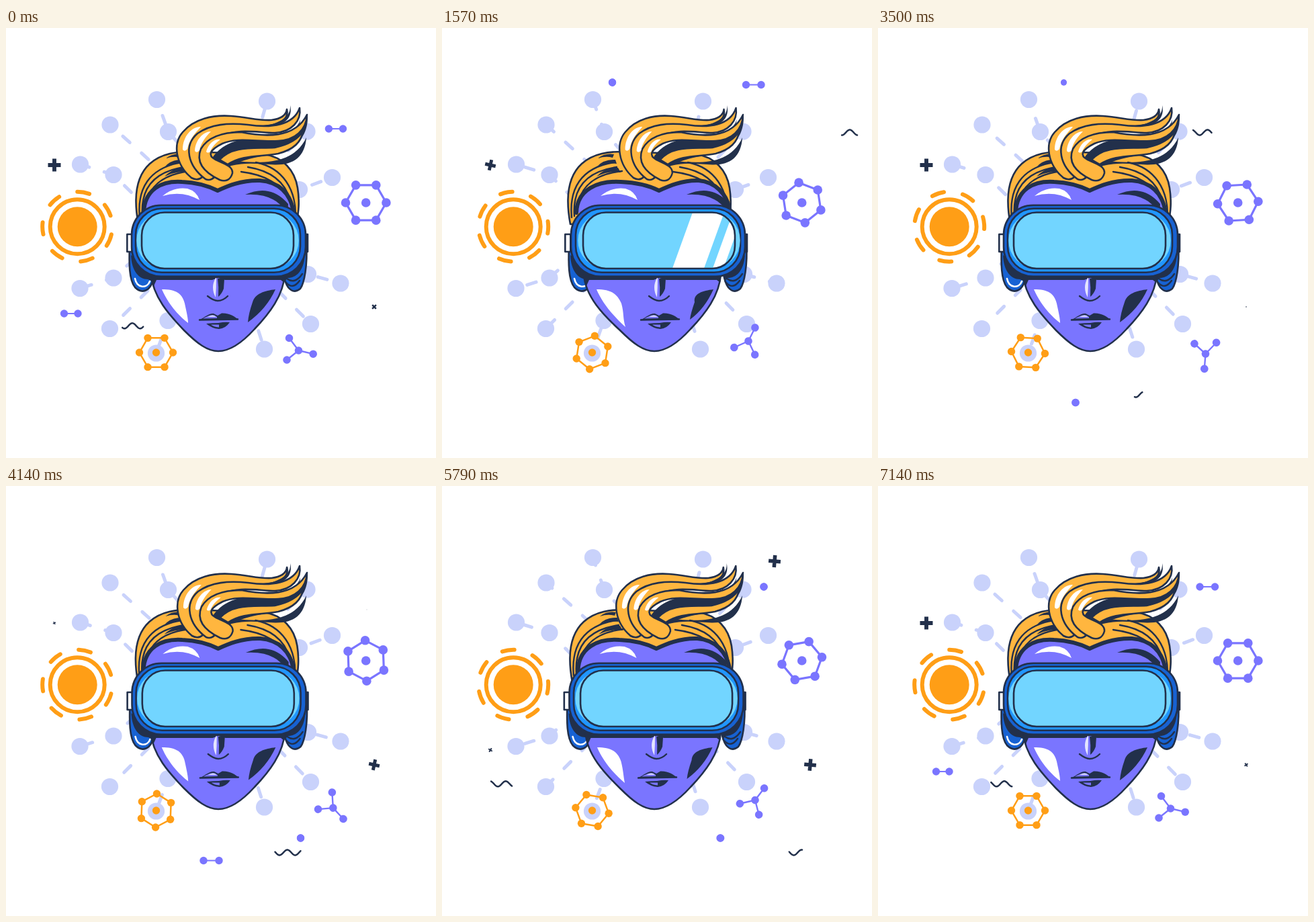
Animation of 640 by 640 pixels, one loop 7.21 s. Source, as an HTML page:

```html
<!DOCTYPE html>
<html lang="en">
<head>
<meta charset="utf-8">
<title>VR head</title>
<style>
html, body { margin: 0; width: 100%; height: 100%; overflow: hidden; background: #fff; }
svg { display: block; width: 100vw; height: 100vh; }
</style>
</head>
<body>
<svg id="stage" viewBox="0 0 640 640"></svg>
<script>
const LOOP = 7210, TURN = 7140;
const INK = '#22304b', PURPLE = '#7a75ff', HAIR = '#ffb63f', ORANGE = '#ff9e16',
      PALE = '#c9d2fb', BLUE = '#1762d3', BRIGHT = '#2196ff', LENS = '#72d5ff';
const OUTLINE = `stroke="${INK}" stroke-width="2.6" stroke-linejoin="round"`;

const clamp = v => Math.max(0, Math.min(1, v));
const smooth = v => (v = clamp(v), v * v * (3 - 2 * v));
const wrap = (t, start) => ((t - start) % LOOP + LOOP) % LOOP;

const fill = (d, color) => `<path d="${d}" fill="${color}"/>`;
const shape = (d, color) => `<path d="${d}" fill="${color}" ${OUTLINE}/>`;
const line = (d, color = INK, width = 2.4, extra = '') =>
  `<path d="${d}" fill="none" stroke="${color}" stroke-width="${width}" stroke-linecap="round" stroke-linejoin="round" ${extra}/>`;
const dot = (x, y, r, color) => `<circle cx="${x}" cy="${y}" r="${r}" fill="${color}"/>`;
const box = (x, y, w, h, r, color) =>
  `<rect x="${x}" y="${y}" width="${w}" height="${h}" rx="${r}" fill="${color}" ${OUTLINE}/>`;
const group = (transform, body) => `<g transform="${transform}">${body}</g>`;
const shift = (dx, body) => group(`translate(${dx} 0)`, body);

// Background network: path and dash phase
const NODES = [[224.5, 106.5], [388.5, 109], [155, 144], [241.5, 154.5], [448, 154], [110.5, 203],
  [160, 218.5], [485.5, 222.5], [436.5, 240.5], [110, 387.5], [160, 372], [449.5, 366.5],
  [498, 380], [154.5, 447.5], [241, 435.5], [453.5, 440.5], [384.5, 478], [223.5, 484]];
const LINKS = [
  ['M155 144L218 201', 0], ['M224.5 106.5L241.5 154.5L265 181', 0],
  ['M110.5 203L160 218.5L196 254', 12], ['M388.5 109L378 146', -15],
  ['M448 154L405 198', 0], ['M485.5 222.5L436.5 240.5', -7.5],
  ['M498 380L449.5 366.5', -4.5], ['M453.5 440.5L402 388', -9.5],
  ['M384.5 478L373 442', -11], ['M154.5 447.5L212 390', 3],
  ['M110 387.5L160 372L192 343', 16], ['M223.5 484L241 435.5', -15]];

function network(p) {
  const flow = 25.5 - 12 * 37.5 * p;
  return LINKS.map(([d, phase]) => line(d, PALE, 5,
    `stroke-dasharray="14 23.5" stroke-dashoffset="${-(flow + phase)}"`)).join('')
    + NODES.map(([x, y]) => dot(x, y, 12.6, PALE)).join('');
}

function sun(angle) {
  return dot(106.2, 295.7, 29.5, ORANGE)
    + `<g fill="none" stroke="${ORANGE}" stroke-width="6" stroke-linecap="round">
       <circle cx="106.2" cy="295.7" r="40.5"/>
       <circle cx="106.2" cy="295.7" r="52" pathLength="7" stroke-dasharray=".39 .61"
         transform="rotate(${angle - 90} 106.2 295.7)"/></g>`;
}

function hexagon(x, y, r, angle, color, width, dotR) {
  const pts = [...Array(6)].map((_, i) => {
    const a = (angle + i * 60) * Math.PI / 180;
    return [x + r * Math.cos(a), y + r * Math.sin(a)];
  });
  return line('M' + pts.join('L') + 'Z', color, width)
    + pts.map(([px, py]) => dot(px, py, dotR, color)).join('') + dot(x, y, dotR, color);
}

// Drifting molecule keys: progress, x, y, rotation
const DRIFT = [[0, 435.5, 480, 0], [.22, 456, 466, -77], [.36, 471, 476, -9],
  [.49, 487.5, 485, 81], [.681, 481, 470.5, -40], [.811, 466, 467.5, -66]];

function drift(p, column) {
  const n = DRIFT.length;
  const key = i => {
    const k = DRIFT[(i + n) % n];
    return [k[0] + Math.floor(i / n), k[column]];
  };
  const slope = i => (key(i + 1)[1] - key(i - 1)[1]) / (key(i + 1)[0] - key(i - 1)[0]);
  let i = n - 1;
  while (key(i)[0] > p) i--;
  const [t0, a] = key(i), [t1, b] = key(i + 1);
  const w = t1 - t0, u = (p - t0) / w, v = 1 - u;
  return (1 + 2 * u) * v * v * a + u * v * v * w * slope(i)
    + u * u * (3 - 2 * u) * b - u * u * v * w * slope(i + 1);
}

function molecule(p) {
  const arms = [[-14, -18.5], [21.7, 5.2], [-17.5, 14]];
  return group(`translate(${drift(p, 1)} ${drift(p, 2)}) rotate(${drift(p, 3)})`,
    arms.map(([x, y]) => line(`M0 0L${x} ${y}`, PURPLE, 2.4) + dot(x, y, 5.8, PURPLE)).join('')
    + dot(0, 0, 5.8, PURPLE));
}

// Dumbbells: from x, to x, y, start
const PAIRS = [[479, 501.5, 150, 5750], [475, 452.5, 84.5, 630], [253.5, 276.5, 81, 1530],
  [294, 317, 557.5, 3300], [438.5, 414, 524, 4030], [86.5, 107, 425, 6420]];

function pair([from, to, y, start], t) {
  const u = wrap(t, start) / 2000;
  if (u >= 1) return '';
  const r = 5.7 * clamp((.5 - Math.abs(u - .5)) / .025 + .2);
  const x1 = from + (to - from) * smooth((u - .7) / .2);
  const x2 = from + (to - from) * smooth((u - .1) / .3);
  return line(`M${x1} ${y}H${x2}`, PURPLE, 2.2) + dot(x1, y, r, PURPLE) + dot(x2, y, r, PURPLE);
}

// Waves: path start, path end, y, a crest, window length, start
const WAVES = [[73, 225, 443.3, 188, 31, 5350], [618, 469, 155.5, 537, 37.5, 1246],
  [382, 536, 545.5, 465.3, 38, 3340]];

function wave([from, to, y, crest, size, start], t) {
  const length = Math.abs(to - from), dir = Math.sign(to - from);
  const head = wrap(t, start) * .0705;
  const a = Math.max(0, head - size), b = Math.min(length, head);
  if (a >= b) return '';
  const pts = [];
  for (let i = 0; i <= 40; i++) {
    const x = from + dir * (a + (b - a) * i / 40);
    pts.push([x, y - 4 * Math.cos((x - crest) * 2 * Math.PI / 23.3)]);
  }
  return line('M' + pts.join('L'), INK, 2.5);
}

// Plus signs: x, y, size, start, end
const PLUSES = [[72, 204, 19, 6300, 9335], [72, 204, 19, 2750, 4300], [94, 152, 11, 1600, 2600],
  [94, 152, 11, 4300, 5500], [72, 393, 11, 2000, 3300], [72, 393, 11, 5400, 6700],
  [499, 490, 9, 1900, 3100], [499, 490, 9, 4640, 5700], [548, 415, 19, 6930, 8700],
  [548, 415, 19, 3440, 4700], [548, 415, 19, 5175, 6500], [537, 184, 11, 4100, 5600],
  [495, 112, 19, 5170, 6450], [59, 447, 12, 4700, 5600]];

function plus([x, y, size, start, end], t) {
  const age = wrap(t, start), s = clamp(Math.min(age, end - start - age) / 660);
  if (!s) return '';
  const h = size * s / 2;
  return group(`translate(${x} ${y}) rotate(${80 * (1 - s)})`,
    `<path d="M${-h} 0H${h}M0 ${-h}V${h}" stroke="${INK}" stroke-width="${h * .62}"/>`);
}

const BACK_HAIR =
  shape('M197 292C190 255 192 222 214 202C232 186 255 184 275 184L385 188C412 192 430 212 434 238C437 258 436 272 432 292Z', HAIR)
  + ['M199 282C195 240 212 208 262 200', 'M203 280C200 240 218 214 266 207', 'M207 276C208 240 228 218 274 213',
     'M431 282C432 240 412 208 372 200', 'M426 276C424 238 404 214 360 207', 'M421 268C416 236 392 219 350 214'].map(d => line(d)).join('')
  + ['M238 194Q248 186 262 188L260 193Q250 190 238 194', 'M236 207Q246 195 264 196L266 202Q250 200 236 207',
     'M236 221Q250 207 268 208L272 215Q254 212 236 221'].map(d => fill(d, INK)).join('');

const CURL_SHADE =
  fill('M305 197C320 168 360 160 395 163C420 160 440 150 449 129C450 150 442 168 425 176C415 184 400 188 385 190C365 194 345 198 330 208Z', INK)
  + fill('M340 198C380 201 427 205 447 163C445 192 428 204 400 203.5C380 203 360 199 335 205Z', INK)
  + shape('M318 196C338 174 370 180 400 178C420 174 436 165 442 153C440 170 428 181 405 187C380 192 352 188 330 203Z', HAIR);

const CURLS =
  shape('M276 223C252 203 248 172 263 155C280 135 308 129 335 131C362 133 375 138 395 137C410 135 417 130 418 121C421 133 411 142 398 144C370 150 340 146 318 152C285 165 275 195 292 222Q285 228 276 223Z', HAIR)
  + fill('M423 115C424 130 412 140 388 145C417 147 427 132 423 115', INK)
  + shape('M297 225C270 205 264 175 285 157C305 143 330 141 360 144C395 149 428 145 437 119C440 138 425 155 400 156C370 155 345 150 322 160C298 172 292 200 310 222Q304 228 297 225Z', HAIR)
  + fill('M438 136C434 152 415 160 385 157C412 163 438 155 438 136', INK)
  + shape('M318 226C295 215 282 200 290 180C300 163 322 155 350 155C385 162 430 165 448 129C447 152 430 167 405 168C375 170 345 162 322 172C302 182 300 190 312 196C325 202 338 206 337 216C334 227 326 229 318 226Z', HAIR)
  + fill('M263 181C263 160 278 146 290 147C282 156 273 165 270 180Q266 185 263 181M281 183C282 166 294 154 305 154C297 162 290 171 288 182Q284 187 281 183M298 184C301 172 311 164 319 166C311 172 306 178 304 184Q300 187 298 184', '#fff');

function face(s) {
  const left = 216 - 5 * s, mid = 315 + 8 * s, top = 205 - 5 * s, right = 428 + s;
  const brow = `M${top} 275C${top + 1} 240 232 227 ${262 + 4 * s} 229C${mid - 30} 230 ${mid - 12} 236 ${mid} 242C${mid + 13} 236 ${mid + 35} 226 ${378 + 4 * s} 227C405 229 ${right - 4} 245 ${right} 275`;
  const jaw = `M${left} 366C${left + 2} 400 ${244 - 3 * s} 428 265 450C285 470 300 481 316 481C332 481 350 470 370 448C392 425 413 398 415 366Z`;
  const features =
    fill('M312 372Q304 386 312 401Q313 388 313 372', '#e4e5ff')
    + fill('M315 373H325L324 388Q321 396 316 400Q317 386 315 373', INK)
    + line('M300 399Q309 406 315 406Q323 406 330 399')
    + fill('M288 434C297 430 302 424 309 425L315 428L321 424.500C333 424 341 430 346 434Z', INK)
    + fill('M293 432.500Q304 426 310 427.500L314 430V432Z', PURPLE)
    + fill('M300 430Q308 425 313 430Z', '#d5d6ff')
    + line('M288 434.500L345 433.500')
    + fill('M298 440Q308 439 316 439Q326 437 333 438Q327 447 317 448Q306 447 298 440', INK)
    + fill('M305 441.500L317 441.500V445.500Q309 445 305 441.500', PURPLE);
  return fill(brow + 'Z', PURPLE) + line(brow, INK, 6)
    + shift(3 * s, fill('M233 250Q250 236 270 239Q284 243 288 256Q262 241 233 250', '#fff'))
    + shift(8 * s, fill('M356 248Q394 231 420 262L419 278Q403 245 356 248', INK))
    + shape(jaw, PURPLE)
    + fill(`M${left} 366H416L414 379L409 375H${mid + 11}L${mid} 372L${mid - 8} 375H${left + 8}L${left + 3} 386Z`, INK)
    + shift(-2 * s, fill(`M232 389C250 389 262 393 ${266 + 3 * s} 410C${269 + 4 * s} 424 271 432 ${271 + 4 * s} ${439 + 6 * s}C255 427 240 408 232 389`, '#fff'))
    + shift(3 * s, fill(`M401 389C385 391 371 395 ${367 + 6 * s} 408Q${361 + 6 * s} 425 ${360 + 6 * s} ${438 - 4 * s}Q388 418 401 389`, INK))
    + shift(8 * s, features);
}

const LEFT_EAR =
  shape('M184 322C183 350 183 375 192 386Q202 396 212 388Q219 381 221 366Z', BLUE)
  + fill('M186 338C187 362 198 374 211 374L220 378L222 362Z', INK)
  + line('M192 373C195 388 210 388 214 377', '#fff', 2.6);
const RIGHT_EAR =
  shape('M447 322C449 352 444 380 438 388Q428 396 420 386Q415 379 413 366Z', BLUE)
  + fill('M445 338C443 362 432 372 419 372L414 378V362Z', INK)
  + line('M417 379Q427 390 437 376') + line('M418 373Q430 382 441 366');

function glint(phase) {
  const left = 228 + .44 * (phase - 1260);
  const band = (dx, w, color) =>
    fill(`M${left + dx} 275h${w}l-30 83h${-w}z`, color);
  return `<clipPath id="lens"><rect x="203" y="275.500" width="224" height="81.500" rx="33"/></clipPath>
    <g clip-path="url(#lens)">${band(0, 47, '#fff') + band(60, 16, '#fff')
      + band(126, 31, INK) + band(164, 12, INK)}</g>`;
}

function goggles(s, phase) {
  return shift(3 * s, box(180.3, 307, 8, 26, 0, '#fff'))
    + shift(5 * s, box(441.500, 307, 7.500, 26, 0, INK))
    + shift(5 * s, box(187, 263.800, 259, 106, 44, BLUE))
    + shift(6 * s, box(193, 268.800, 245, 95, 39, BRIGHT))
    + shift(8 * s, fill('M236 274.500H394A34 34 0 0 1 394 358H236A34 34 0 0 1 236 274.500Z', LENS)
      + glint(phase) + box(202, 274.500, 226, 83.500, 34, 'none'));
}

function head(t) {
  const phase = t % (LOOP / 2);
  const s = smooth((phase - 400) / 700) - smooth((phase - 1820) / 740);
  const curlScale = `translate(448 0) scale(${1 - .052 * s} 1) translate(-448 0)`;
  return shift(-6 * s, BACK_HAIR)
    + shift(5 * s, LEFT_EAR) + shift(6 * s, RIGHT_EAR)
    + face(s) + goggles(s, phase)
    + group(curlScale, CURL_SHADE + CURLS);
}

function render(t) {
  const p = clamp(t / TURN);
  const turn = 360 * p + 2 * Math.sin(2 * Math.PI * p);
  return network(p % 1) + sun(turn)
    + hexagon(535.7, 260, 30.2, turn, PURPLE, 3.2, 6.8)
    + hexagon(223.5, 483, 25, -turn, ORANGE, 2.5, 5.7)
    + molecule(p % 1)
    + head(t)
    + PAIRS.map(k => pair(k, t)).join('')
    + WAVES.map(k => wave(k, t)).join('')
    + PLUSES.map(k => plus(k, t)).join('');
}

const stage = document.getElementById('stage');
const begin = performance.now();
function tick() {
  stage.innerHTML = render((performance.now() - begin) % LOOP);
  requestAnimationFrame(tick);
}
tick();
</script>
</body>
</html>
```
